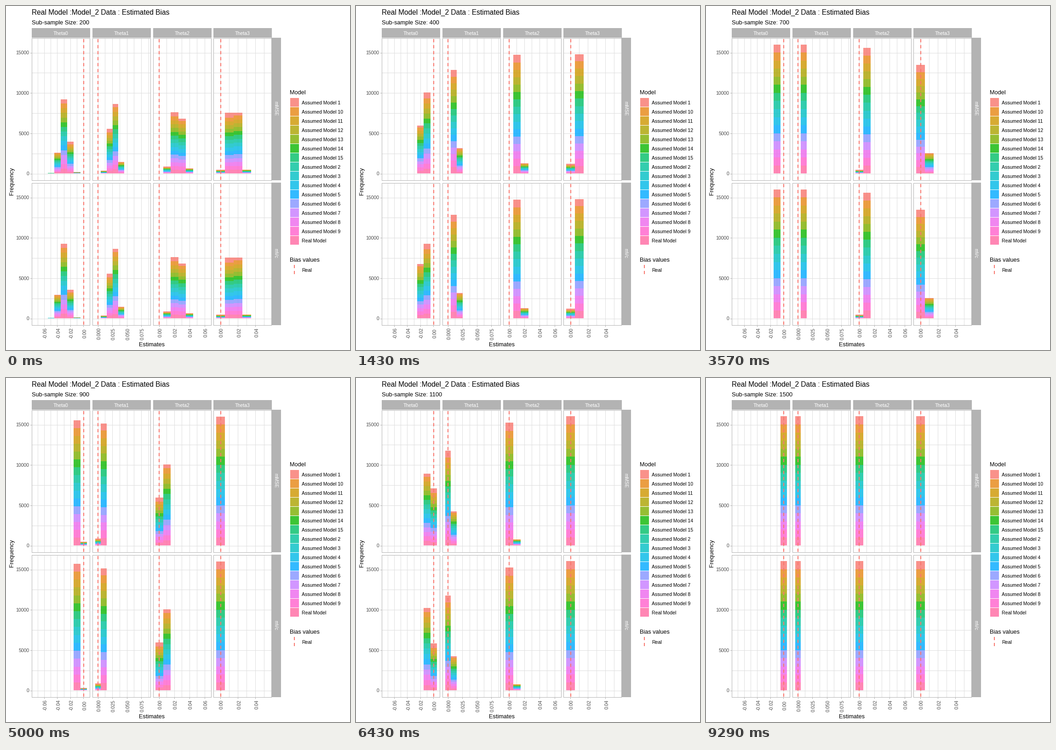
Write a matplotlib script that moves like this. It is 748x748 px and loops after 10 s.

```python
import math
import numpy as np
import matplotlib.pyplot as plt
from matplotlib.animation import FuncAnimation
from matplotlib.collections import LineCollection, PolyCollection
from matplotlib.patches import Rectangle

STAGE, DPI = 748, 100
LOOP, FRAMES = 10000, 100
GREY, GRID, DASH, DARK = "#b3b3b3", "#dedede", "#f8766d", "#4d4d4d"
SIZES = range(200, 1600, 100)
TOTAL, MODELS = 16000, 16
PX_PER_COUNT = 0.01756
LEAD = 0.4         # the first model lies a little closer to zero bias
PANEL_W, PANEL_H = 126, 309

plt.rcParams["font.family"] = "Liberation Sans"

# (top, y of zero, label)
ROWS = [(69, 364.4, "mMSE"), (384, 679.4, "mVc")]

# Bias and spread, in bins, are given at size 200 and shrink as powers of the size.
PANELS = [
    dict(name="Theta0", left=56, zero=168.7, bin=14.2, side=-1, label_y=711.5,
         ticks=["-0.06", "-0.04", "-0.02", "0.00"],
         bias=2.9, bias_pow=1.023, spread=0.62, spread_pow=1.49, row_gain=1.02),
    dict(name="Theta1", left=188, zero=200.1, bin=12.6, side=1, label_y=712.5,
         ticks=["0.000", "0.025", "0.050", "0.075"],
         bias=2.7, bias_pow=1.018, spread=0.6, spread_pow=1.62, row_gain=1),
    dict(name="Theta2", left=320, zero=333.4, bin=16.45, side=1, label_y=709.5,
         ticks=["0.00", "0.02", "0.04", "0.06"],
         bias=2.45, bias_pow=1.03, spread=0.6, spread_pow=1.5, row_gain=1),
    dict(name="Theta3", left=451, zero=466.6, bin=19.05, side=1, label_y=709.5,
         ticks=["0.00", "0.02", "0.04"],
         bias=1.5, bias_pow=1.0, spread=0.53, spread_pow=1.6, row_gain=1),
]


def hcl(hue, chroma=100, lum=65):
    """Polar LUV to sRGB."""
    u, v = chroma * math.cos(hue), chroma * math.sin(hue)
    xn, yn, zn = 0.95047, 1.0, 1.08883
    d = xn + 15 * yn + 3 * zn
    up = u / (13 * lum) + 4 * xn / d
    vp = v / (13 * lum) + 9 * yn / d
    y = ((lum + 16) / 116) ** 3
    x = y * 9 * up / (4 * vp)
    z = y * (12 - 3 * up - 20 * vp) / (4 * vp)
    lin = np.array([3.2406 * x - 1.5372 * y - 0.4986 * z,
                    -0.9689 * x + 1.8758 * y + 0.0415 * z,
                    0.0557 * x - 0.2040 * y + 1.0570 * z]).clip(0, 1)
    return np.where(lin <= 0.0031308, 12.92 * lin, 1.055 * lin ** (1 / 2.4) - 0.055)


COLORS = [(*hcl(math.radians(15 + 360 * i / MODELS)), 0.8) for i in range(MODELS)]


def normal_cdf(z):
    return np.array([0.5 * (1 + math.erf(v / math.sqrt(2))) for v in z])


def stacks(panel, row, size):
    """Counts per bin away from zero, as (first model, each other model)."""
    growth = size / 200
    bias = panel["bias"] * growth ** -panel["bias_pow"] * panel["row_gain"] ** row
    spread = panel["spread"] * growth ** -panel["spread_pow"]
    z = (np.arange(0.5, 7) - bias) / spread
    total = np.diff(normal_cdf(z), prepend=0) * TOTAL
    lead = np.diff(normal_cdf(z + LEAD), prepend=0) * TOTAL / MODELS
    lead = np.minimum(lead, total)
    return lead, (total - lead) / (MODELS - 1)


def bars(size):
    verts, fills = [], []
    for panel in PANELS:
        for row, (_, base, _) in enumerate(ROWS):
            for b, (lead, rest) in enumerate(zip(*stacks(panel, row, size))):
                if lead + rest * (MODELS - 1) < 30:
                    continue
                mid = panel["zero"] + panel["side"] * b * panel["bin"]
                x0, x1 = (round(mid + s * panel["bin"] / 2) for s in (-1, 1))
                level = 0
                for m in reversed(range(MODELS)):
                    y0 = round(base - level * PX_PER_COUNT)
                    level += rest if m else lead
                    y1 = round(base - level * PX_PER_COUNT)
                    if y1 < y0:
                        verts.append([(x0, y0), (x1, y0), (x1, y1), (x0, y1)])
                        fills.append(COLORS[m])
    return verts, fills


fig = plt.figure(figsize=(STAGE / DPI, STAGE / DPI), dpi=DPI, facecolor="white")
ax = fig.add_axes([0, 0, 1, 1])
ax.set(xlim=(0, STAGE), ylim=(STAGE, 0))
ax.axis("off")


def pt(px):
    return px * 72 / DPI


def text(x, y, s, px=10.55, color="black", **kw):
    kw = {"ha": "left", "va": "baseline", **kw}
    return ax.text(x, y, s, fontsize=pt(px), color=color, zorder=6, **kw)


def lines(segs, color, z):
    segs = [[(math.floor(x) + 0.5, math.floor(y) + 0.5) for x, y in s] for s in segs]
    ax.add_collection(LineCollection(segs, colors=color, linewidths=pt(1),
                                     antialiaseds=False, capstyle="projecting", zorder=z))


def box(x, y, w, h, color):
    ax.add_patch(Rectangle((x, y), w, h, facecolor=color, linewidth=0,
                           antialiased=False, zorder=5))


def dashed(x, y0, y1):
    ax.plot([round(x)] * 2, [y0, y1], color=DASH, lw=pt(2), zorder=4,
            dashes=(3.5, 3), dash_capstyle="butt")


def tick_x(panel, k):
    value = float(panel["ticks"][0])
    step = float(panel["ticks"][1]) - value
    return panel["zero"] + (value + k * step) * 100 * panel["bin"]


def draw_panel(panel, top, base):
    left, right, bottom = panel["left"], panel["left"] + PANEL_W, top + PANEL_H
    ys = [base - c * PX_PER_COUNT for c in range(0, 15001, 2500)]
    xs = [tick_x(panel, k / 2) for k in range(-2, 10)]
    lines([[(left, y), (right, y)] for y in ys]
          + [[(x, top), (x, bottom)] for x in xs if left < x < right], GRID, 1)
    frame = [(left, top), (right, top), (right, bottom), (left, bottom), (left, top)]
    lines(list(zip(frame, frame[1:])), GREY, 5)
    dashed(panel["zero"], bottom, top)


for panel in PANELS:
    box(panel["left"], 48, PANEL_W + 1, 21, GREY)
    text(panel["left"] + PANEL_W / 2, 63, panel["name"], color="white", ha="center")
    for top, base, _ in ROWS:
        draw_panel(panel, top, base)
    for k, label in enumerate(panel["ticks"]):
        x = tick_x(panel, k)
        lines([[(x, 694), (x, 696)]], GREY, 5)
        text(x + 2.5, panel["label_y"], label, color=DARK, rotation=90,
             ha="center", va="center")

for top, base, label in ROWS:
    box(577, top, 21, PANEL_H + 1, GREY)
    text(586.5, top + PANEL_H / 2 - 1, label, color="white", rotation=-90,
         ha="center", va="center")
    for count in range(0, 15001, 5000):
        y = base - count * PX_PER_COUNT
        lines([[(53, y), (55, y)]], GREY, 5)
        text(50.5, y + 4, str(count), color=DARK, ha="right")

text(56.5, 19, "Real Model :Model_2 Data : Estimated Bias", 15.5)
subtitle = text(56.5, 40, "", 12.75)
text(317, 740, "Estimates", 12.75, ha="center")
text(13.5, 381, "Frequency", 12.75, rotation=90, ha="center", va="center")

text(617, 192, "Model", 12.75)
names = sorted(f"Assumed Model {i}" for i in range(1, MODELS)) + ["Real Model"]
for i, (name, color) in enumerate(zip(names, COLORS)):
    y = 210 + i * 19.97
    box(618, round(y - 9.9), 19, 19, color)
    text(643, y + 4, name)
text(617, 556, "Bias values", 12.75)
dashed(627, 583, 563)
text(643, 578, "Real")

stack = PolyCollection([], linewidths=0, antialiaseds=False, zorder=3)
ax.add_collection(stack, autolim=False)


def update(i):
    # each step begins on the last tick before its exact time
    tick = LOOP // FRAMES
    size = SIZES[((i + 1) * tick - 1) * len(SIZES) // LOOP]
    verts, fills = bars(size)
    stack.set_verts(verts)
    stack.set_facecolor(fills)
    subtitle.set_text(f"Sub-sample Size: {size}")
    return stack, subtitle


anim = FuncAnimation(fig, update, frames=FRAMES, interval=LOOP / FRAMES,
                     init_func=lambda: update(0), repeat=True, repeat_delay=0)
plt.show()
```
